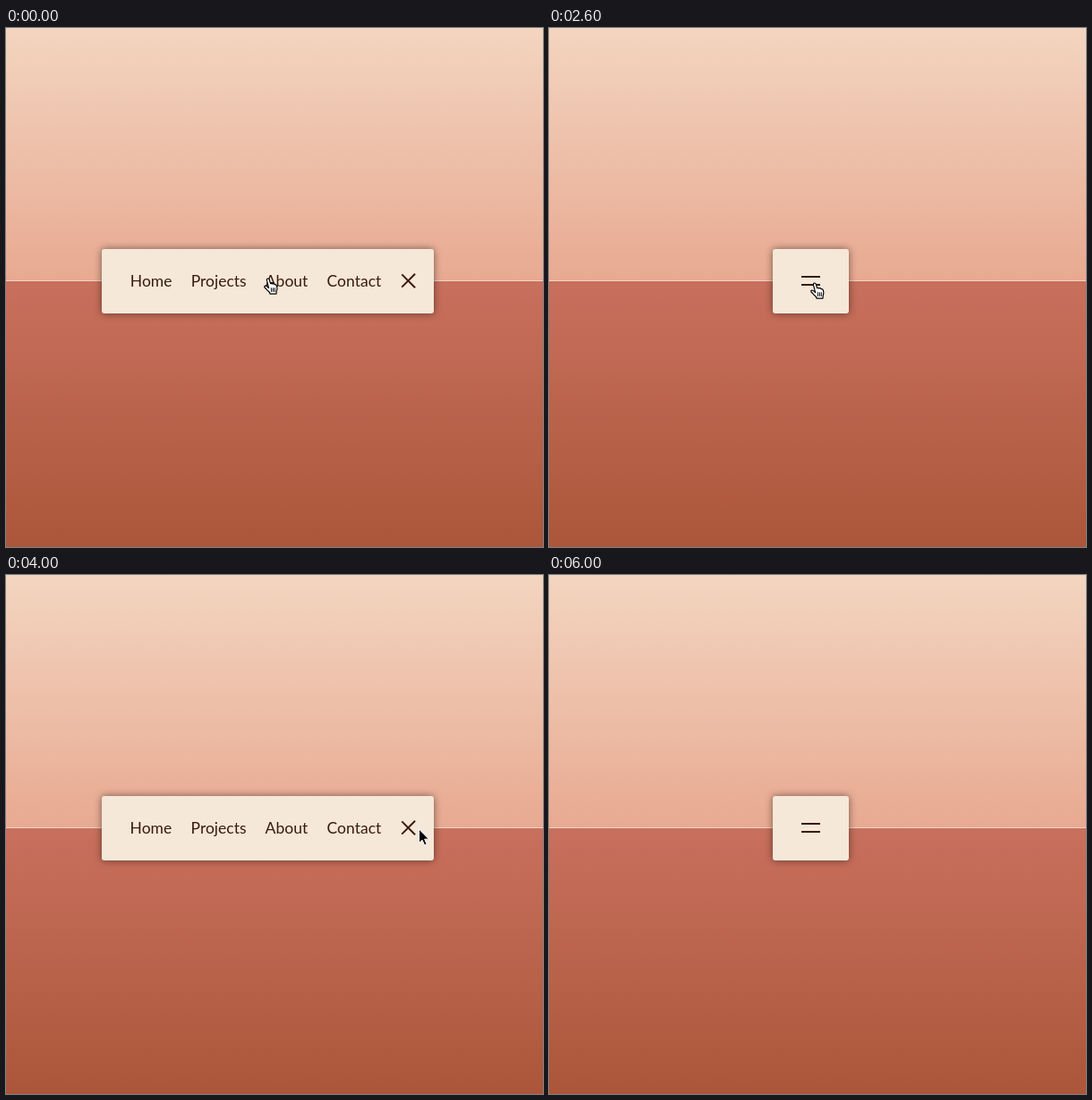
An HTML page for the animation above (6.1 s loop, 600 by 580 pixels).

```html
<!DOCTYPE html>
<html lang="en">
<head>
<meta charset="utf-8">
<title>Animated navigation</title>
<style>
  html, body { margin: 0; width: 100%; height: 100%; overflow: hidden; }
  body {
    position: relative;
    background:
      linear-gradient(#f3d5c0, #e8a991) 0 0 / 100% 282.5px no-repeat,
      linear-gradient(#c8705d, #ab563a) 0 282.5px / 100% 297.5px no-repeat;
    font: 17.5px Lato, sans-serif;
  }
  nav {
    position: absolute; top: 246.5px; left: 292.5px; height: 72.5px;
    box-sizing: border-box; padding: 0 21.25px;
    display: flex; align-items: center; justify-content: center;
    background: #f5e8d8; border-radius: 3px;
    box-shadow: 0 0 8px rgba(0, 0, 0, .5);
  }
  ul { display: flex; margin: 0; padding: 0; list-style: none; }
  li span { margin: 0 10.6px; color: #3a1a0f; }
  .icon { position: relative; width: 31.9px; height: 31.9px; background: #f5e8d8; }
  .icon i {
    position: absolute; left: 5.3px; top: 10.6px;
    width: 21.25px; height: 2.1px; background: #3a1a0f;
  }
  .icon i + i { top: auto; bottom: 10.6px; }
  svg { position: absolute; left: 0; top: 0; overflow: visible; }
</style>
</head>
<body>
<nav>
  <ul>
    <li><span>Home</span></li>
    <li><span>Projects</span></li>
    <li><span>About</span></li>
    <li><span>Contact</span></li>
  </ul>
  <div class="icon"><i></i><i></i></div>
</nav>
<svg id="cursor" width="20" height="20">
  <g id="hand" transform="translate(-4.4 -.8)" stroke="#000" stroke-linejoin="round" stroke-linecap="round">
    <path fill="#fff" stroke-width="1.2" d="M5.5 11.5L3.4 3Q3 1 4.4 .8Q5.8 .6 6.3 2.4L7.4 6.5Q8.6 5.6 9.6 6.8Q11 6 12 7.4Q13.6 7 14.3 9Q15.4 12 14.2 14.5L13.8 18H7Q6.5 15.5 3.5 13.5L1 10.8Q0 9.4 1.6 8.8Q3 8.6 5.5 11.5"/>
    <path fill="none" d="M8.3 11.5v3.8M10.3 11.5v3.8M12.2 11.5v3.8"/>
  </g>
  <path id="arrow" stroke="#fff" d="M0 0V15.5L3.6 12.2L6 17.8L8.6 16.7L6.2 11.2H11Z"/>
</svg>
<script>
const LOOP = 6100, STEP = 100;
// The menu starts open; each later entry toggles it.
const toggles = [-LOOP, 1129, 2614, 4946];
// Pointer hot spot: time, x, y
const track = [
  [0, 292.5, 280], [300, 144, 286.5], [700, 447, 282.5], [1600, 447, 282.5],
  [2100, 324, 296], [2400, 296.5, 285], [3200, 296.5, 285], [3800, 461.5, 284],
  [4300, 461.5, 284], [4700, 450, 283], [5100, 450, 283], [5300, 441, 203], [LOOP, 441, 203]
];
const $ = s => document.querySelector(s);
const nav = $('nav'), list = $('ul'), items = document.querySelectorAll('li');
const [line1, line2] = document.querySelectorAll('i');
const cursor = $('#cursor'), hand = $('#hand'), arrow = $('#arrow');

// How far open a part is whose transition takes `duration` ms
function openness(t, duration) {
  const i = toggles.findLastIndex(at => at <= t);
  const p = Math.min(1, (t - toggles[i]) / duration);
  return i % 2 ? 1 - p : p;
}

function drawMenu(t) {
  const p = openness(t, 800), turn = openness(t, 900);
  const width = 85 + 286 * p;
  nav.style.width = width + 'px';
  nav.style.marginLeft = -width / 2 + 'px';
  list.style.width = openness(t, 300) * 100 + '%';
  for (const { style } of items) {
    style.transform = `rotateY(${360 * turn}deg)`;
    style.opacity = turn ** 2;
  }
  line1.style.transform = `rotate(${-765 * p}deg) translateY(${5.84 * p}px)`;
  line2.style.transform = `rotate(${765 * p}deg) translateY(${-5.84 * p}px)`;
}

function drawCursor(t) {
  const i = track.findIndex(k => k[0] > t);
  const [t0, x0, y0] = track[i - 1], [t1, x1, y1] = track[i];
  const p = (t - t0) / (t1 - t0);
  cursor.style.transform = `translate(${x0 + (x1 - x0) * p}px, ${y0 + (y1 - y0) * p}px)`;
  const isArrow = t > 1600 && t < 2300 || t >= 3800;
  hand.style.display = isArrow ? 'none' : '';
  arrow.style.display = isArrow ? '' : 'none';
  cursor.style.display = t > 5300 ? 'none' : '';
}

const start = performance.now();
function frame() {
  const t = Math.floor((performance.now() - start) % LOOP / STEP) * STEP;
  drawMenu(t);
  drawCursor(t);
  requestAnimationFrame(frame);
}
frame();
</script>
</body>
</html>
```
